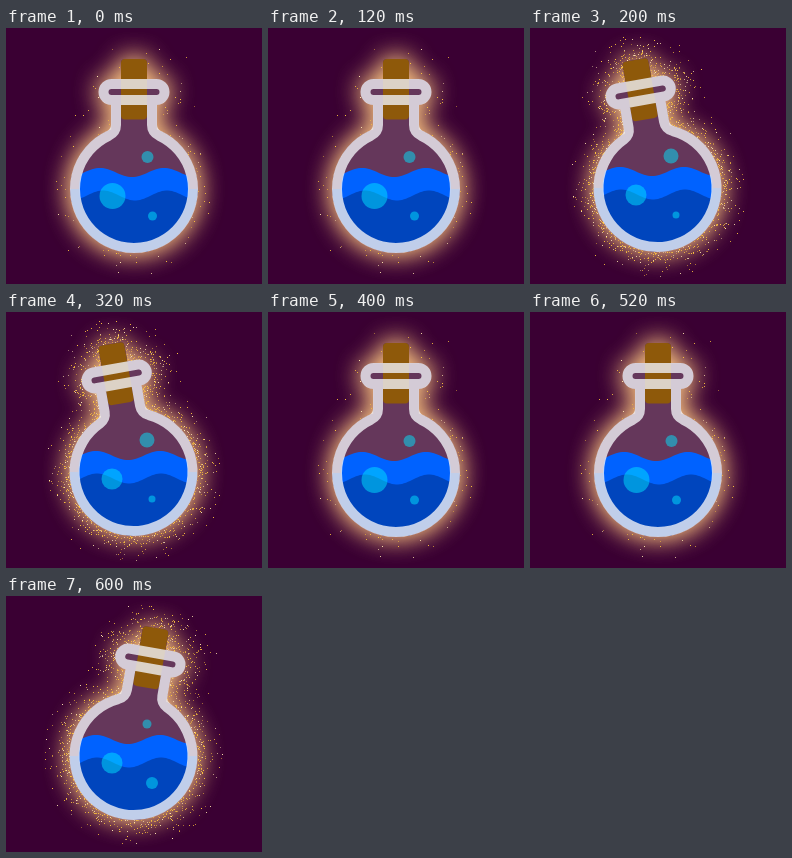
Recreate the animation shown at these times as an HTML page with a canvas. Size 256 by 256 pixels, loop 0.8 s.

```html
<!DOCTYPE html>
<html>
<head>
<meta charset="utf-8">
<style>
html, body { margin: 0; width: 100%; height: 100%; overflow: hidden; background: #3a0033; }
canvas { display: block; width: 256px; height: 256px; }
</style>
</head>
<body>
<canvas id="stage" width="256" height="256"></canvas>
<script>
const ctx = document.getElementById('stage').getContext('2d');
const BG = '#3a0033', CORK = '#8e590a', INSIDE = '#65375b', DEEP = '#0045bd';
const TAU = Math.PI * 2;

// Bubble radii, wave crests (back, front) and sparkles for each pose.
const still = { tilt: 0, cx: 128, cy: 161, radii: [6, 13, 4.5], back: 94, front: 97, dots: 95, spread: 10, seed: 5 };
const lean = { cx: 127.5, cy: 160, radii: [7.5, 10.5, 3.5], back: 90, front: 91, dots: 950, spread: 7.5, seed: 21 };
const poses = [
  { ...still },
  { ...lean, tilt: -10 },
  { ...still },
  { ...lean, tilt: 10, radii: [4.5, 10.5, 6], seed: 34 }
];

function random(seed) {
  return () => (seed = (seed * 16807) % 2147483647) / 2147483647;
}

// Flask coordinates: the centre of the bulb is the origin.
const cork = new Path2D();
cork.roundRect(-13, -130, 26, 60.5, 4);
const lip = new Path2D();
lip.roundRect(-30.5, -105, 61, 16, 8);
const glass = new Path2D('M-18-88V-64Q-18-57-25-53.4A59 59 0 1 0 25-53.4Q18-57 18-64V-88');
glass.addPath(lip);
const shape = new Path2D();
shape.arc(0, 0, 63.5, 0, TAU);
shape.rect(-22.5, -95, 45, 50);
shape.roundRect(-35, -109.5, 70, 25, 12.5);
shape.addPath(cork);

function circle(x, y, r, color) {
  ctx.fillStyle = color;
  ctx.beginPath();
  ctx.arc(x, y, r, 0, TAU);
  ctx.fill();
}

function wave(level, crest, height, color) {
  ctx.fillStyle = color;
  ctx.beginPath();
  ctx.moveTo(60, 230);
  for (let x = 60; x <= 196; x += 2) {
    ctx.lineTo(x, level - height * Math.cos((x - crest) / 64 * TAU));
  }
  ctx.lineTo(196, 230);
  ctx.fill();
}

// Distance from the outside of the flask, in flask coordinates.
function distance(x, y) {
  const box = (w, top, bottom) =>
    Math.hypot(Math.max(0, Math.abs(x) - w), Math.max(0, top - y, y - bottom));
  return Math.min(Math.max(0, Math.hypot(x, y) - 64),
    box(23, -90, -55), box(35, -110, -84), box(13, -130, -100));
}

function sparkle(p) {
  const rnd = random(p.seed * 7919);
  const a = p.tilt * Math.PI / 180, cos = Math.cos(a), sin = Math.sin(a);
  for (let left = p.dots; left > 0;) {
    const x = Math.floor(38 + rnd() * 180), y = Math.floor(9 + rnd() * 240);
    const dx = x - p.cx, dy = y - p.cy;
    const d = distance(dx * cos + dy * sin, dy * cos - dx * sin);
    if (d <= 0 || d > 30 || rnd() > Math.exp(-d / p.spread)) continue;
    ctx.globalAlpha = 0.45 + 0.55 * rnd();
    ctx.fillStyle = rnd() < 0.75 ? '#ffc63c' : '#ffe6b0';
    ctx.fillRect(x, y, 1, 1);
    left--;
  }
  ctx.globalAlpha = 1;
}

function inFlask(p, paint) {
  ctx.save();
  ctx.translate(p.cx, p.cy);
  ctx.rotate(p.tilt * Math.PI / 180);
  paint();
  ctx.restore();
}

function glow() {
  ctx.fillStyle = INSIDE;
  ctx.shadowBlur = 26;
  for (const alpha of [1, 0.6]) {
    ctx.shadowColor = `rgba(255,200,130,${alpha})`;
    ctx.fill(shape);
  }
}

function draw(p) {
  const dy = p.cy - 161;
  ctx.fillStyle = BG;
  ctx.fillRect(0, 0, 256, 256);
  inFlask(p, glow);
  sparkle(p);

  inFlask(p, () => {
    ctx.fillStyle = INSIDE;
    ctx.fill(shape);
    ctx.fillStyle = CORK;
    ctx.fill(cork);
  });

  // The lower half of the glass wall is tinted by the liquid behind it.
  ctx.fillStyle = DEEP;
  ctx.beginPath();
  ctx.arc(p.cx, p.cy, 63.5, 0, Math.PI);
  ctx.arc(p.cx, p.cy, 54, Math.PI, 0, true);
  ctx.fill();

  ctx.save();
  ctx.beginPath();
  ctx.arc(p.cx, p.cy, 55, 0, TAU);
  ctx.clip();
  wave(144.5 + dy, p.back, 4.5, '#0062ff');
  wave(167.5 + dy, p.front, 5, DEEP);
  ctx.restore();

  const spots = [[13.5, -32], [-21.5, 7], [18.5, 27]];
  spots.forEach(([x, y], i) => circle(p.cx + x, p.cy + y, p.radii[i], 'rgba(0,230,255,.5)'));

  inFlask(p, () => {
    ctx.lineWidth = 10;
    ctx.strokeStyle = 'rgba(240,240,246,.8)';
    ctx.stroke(glass);
  });
}

let shown = -1;
function tick(now) {
  const step = Math.floor(now % 800 / 200);
  if (step !== shown) draw(poses[shown = step]);
  requestAnimationFrame(tick);
}
tick(performance.now());
</script>
</body>
</html>
```
